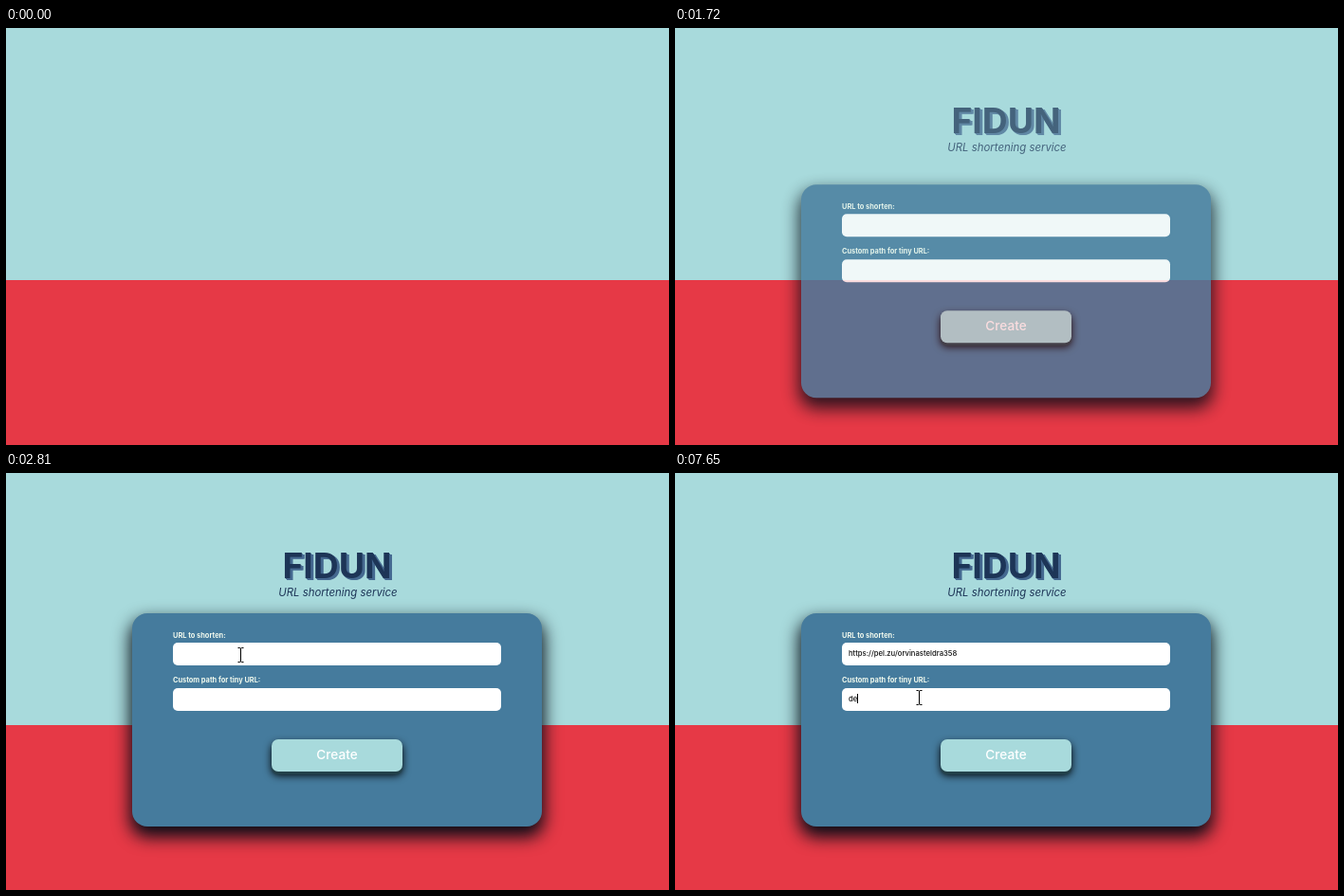
Animation, 699 px wide and 440 px high, one loop 8 s. Source, as an HTML page:

```html
<!DOCTYPE html>
<html lang="en">
<head>
<meta charset="utf-8">
<title>URL shortening service</title>
<style>
  html, body { margin: 0; width: 100%; height: 100%; overflow: hidden; }
  body {
    position: relative;
    background: linear-gradient(#a8dadc 266px, #e63946 266px);
    font-family: Inter, Roboto, sans-serif;
    color: #1d3557;
  }
  body * { position: absolute; box-sizing: border-box; white-space: nowrap; }
  #heading { left: 0; top: 0; width: 699px; text-align: center; }
  h1, p { margin: 0; width: 100%; }
  h1 {
    top: 77.5px; left: -.5px;
    font-size: 37.3px; line-height: 40px; font-weight: 700;
    text-shadow: 1px 1px #456990, 2px 2px #456990, 3px 2px #456990;
  }
  p { top: 115.5px; left: .5px; font-size: 11.4px; line-height: 20px; font-style: italic; }
  #panel {
    left: 133px; top: 148px; width: 432px; height: 225px;
    border-radius: 16px; background: #457b9d;
    box-shadow: 0 9px 18px 2px #060c16;
  }
  label { left: 43px; font-size: 7.4px; line-height: 12px; font-weight: 700; color: #f1faee; }
  .field {
    left: 43px; width: 346px; height: 24px; padding-left: 7px;
    border-radius: 5px; background: #fff; color: #111;
    font-size: 7.7px; line-height: 24px; font-weight: 500;
  }
  .field * { position: static; }
  .field i {
    display: inline-block; width: 1px; height: 10px;
    background: #000; vertical-align: middle;
  }
  #create {
    left: 147px; top: 132.5px; width: 138px; height: 34px;
    border-radius: 7px; background: #a8dadc; color: #fff;
    font-size: 13.6px; line-height: 33px; font-weight: 500; text-align: center;
    box-shadow: 0 3px 1px #23424b, 0 4px 9px #000;
  }
  svg { left: 0; top: 0; overflow: visible; }
  #beam { mix-blend-mode: difference; }
</style>
</head>
<body>
<div id="heading"><h1>FIDUN</h1><p>URL shortening service</p></div>
<div id="panel">
  <label style="top:18px">URL to shorten:</label>
  <div class="field" style="top:31px"><span></span><i></i></div>
  <label style="top:65px">Custom path for tiny URL:</label>
  <div class="field" style="top:78.5px"><span></span><i></i></div>
  <div id="create">Create</div>
</div>
<svg id="beam" width="1" height="1"><path d="M-3-7.5H-1L0-7L1-7.5H3M-3 7.5H-1L0 7L1 7.5H3M0-7V7" fill="none" stroke="#fff"/></svg>
<svg id="arrow" width="1" height="1"><path d="M.5.5V16L4 12.5L6.5 18L9 17L6.5 11.5H11Z" fill="#fff" stroke="#000"/></svg>
<script>
const LOOP = 8000;
const STEP = 110;
const URL_TEXT = "https://pel.zu/orvinasteldra358";
const INTRO_STEPS = [1500, 1620, 1720, 1830, 1940, 2050];

// [time, first text, second text, field holding the visible caret or -1]
const TYPING = [
  [0, "", "", -1],
  [3040, "", "", 0],
  [3470, "", "", -1],
  [4020, "", "", 0],
  [4240, URL_TEXT, "", 0],
  [4680, URL_TEXT, "", -1],
  [5240, URL_TEXT, "", 0],
  [5570, URL_TEXT, "", 1],
  [6000, URL_TEXT, "", -1],
  [6550, URL_TEXT, "", 1],
  [7100, URL_TEXT, "", -1],
  [7220, URL_TEXT, "d", 1],
  [7650, URL_TEXT, "de", 1]
];

const $ = id => document.getElementById(id);
const fields = [...document.querySelectorAll(".field")];
const clamp = v => Math.min(1, Math.max(0, v));
const mix = (a, b, p) => a + (b - a) * p;

// The CSS "ease" curve, cubic-bezier(.25, .1, .25, 1)
function ease(x) {
  const curve = (a, b, u) => 3 * a * u * (1 - u) ** 2 + 3 * b * u * u * (1 - u) + u ** 3;
  let low = 0, high = 1;
  for (let i = 0; i < 20; i++) {
    const mid = (low + high) / 2;
    if (curve(.25, .25, mid) < x) low = mid; else high = mid;
  }
  return curve(.1, 1, high);
}

// Eased progress of a pointer move that advances in fixed steps
function stepped(t, start, duration) {
  const p = clamp(Math.floor((t - start) / STEP) * STEP / duration);
  return 1 - (1 - p) ** 2;
}

function pointerAt(t) {
  if (t < 4570) {
    const p = stepped(t, 2260, 550);
    return [mix(302, 247.5, p), mix(335, 192, p)];
  }
  if (t < 5470) {
    const p = stepped(t, 4570, 660);
    return [mix(250.5, 258.5, p), mix(198, 238, p)];
  }
  return t < 6000 ? [259.5, 238] : [257.5, 237];
}

function drawIntro(t) {
  const now = INTRO_STEPS.findLast(s => s <= t) ?? 0;
  const slide = ease(clamp((now - 1462) / 490));
  const fade = ease(clamp((now - 1475) / 575));
  $("heading").style.opacity = fade;
  $("panel").style.opacity = slide;
  $("panel").style.transform = `translateY(${100 * (1 - slide)}px)`;
}

function drawFields(t) {
  const state = TYPING.findLast(s => s[0] <= t);
  fields.forEach((field, i) => {
    field.firstChild.textContent = state[i + 1];
    field.lastChild.style.visibility = state[3] === i ? "visible" : "hidden";
  });
}

function drawPointer(t) {
  const [x, y] = pointerAt(t);
  const overText = y < 203 || (y > 213 && y < 251);
  for (const id of ["beam", "arrow"]) {
    const shown = t >= 2260 && overText === (id === "beam");
    $(id).style.display = shown ? "block" : "none";
    $(id).style.transform = `translate(${Math.floor(x) + .5}px, ${Math.round(y)}px)`;
  }
}

function frame() {
  const t = performance.now() % LOOP;
  drawIntro(t);
  drawFields(t);
  drawPointer(t);
  requestAnimationFrame(frame);
}
frame();
</script>
</body>
</html>
```
